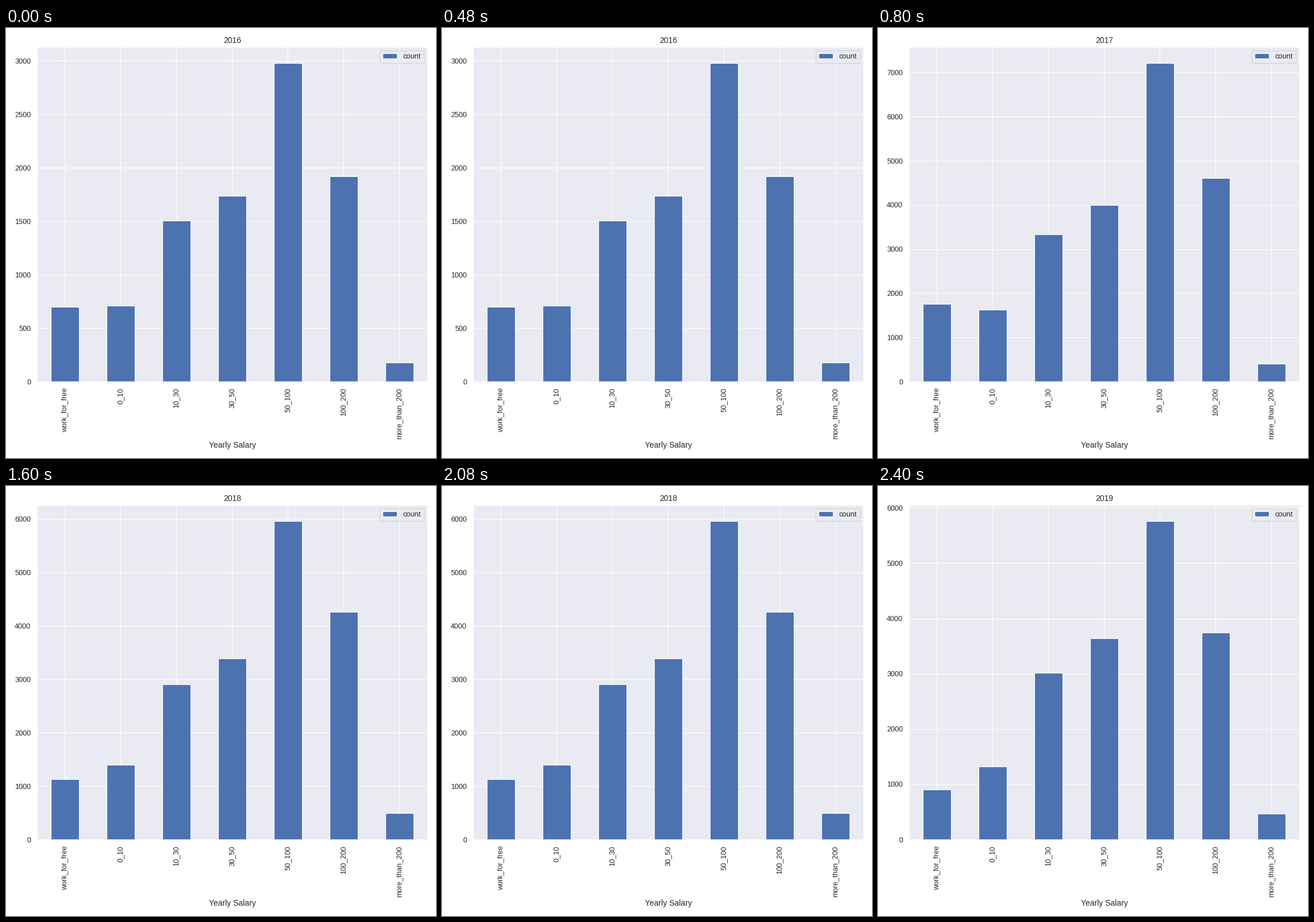
A matplotlib script for the animation above (3200 ms loop, 748x748 px).

```python
import matplotlib.pyplot as plt
from matplotlib.animation import FuncAnimation

SIZE = 748
INCHES = 8.5
DPI = 88
K = INCHES / 9  # style sizes are meant for a nine-inch chart

BLUE, PANEL, INK = "#4C72B0", "#EAEAF2", "0.15"
LEFT, RIGHT, TOP, BOTTOM = 54, 733, 32.8, 615  # plot edges in pixels

GROUPS = ["work_for_free", "0_10", "10_30", "30_50",
          "50_100", "100_200", "more_than_200"]
# year, tick step, count per group
YEARS = [
    (2016, 500, [699, 712, 1506, 1740, 2983, 1922, 176]),
    (2017, 1000, [1757, 1627, 3334, 3998, 7221, 4604, 404]),
    (2018, 1000, [1130, 1398, 2905, 3389, 5966, 4260, 490]),
    (2019, 1000, [909, 1322, 3017, 3644, 5769, 3749, 472]),
]

plt.rcParams.update({
    "font.family": "Liberation Sans",
    "text.color": INK,
    "axes.labelcolor": INK,
})

fig = plt.figure(figsize=(INCHES, INCHES), dpi=DPI, facecolor="white")
ax = fig.add_axes([LEFT / SIZE, 1 - BOTTOM / SIZE,
                   (RIGHT - LEFT) / SIZE, (BOTTOM - TOP) / SIZE],
                  facecolor=PANEL)
ax.set_axisbelow(True)
ax.grid(color="white", linewidth=K)
for spine in ax.spines.values():
    spine.set(color="white", linewidth=1.25 * K)

bars = ax.bar(range(len(GROUPS)), YEARS[0][2], width=0.5, color=BLUE,
              edgecolor="white", linewidth=K, label="count")
ax.set_xlim(-0.5, len(GROUPS) - 0.5)
ax.set_xticks(range(len(GROUPS)), GROUPS, rotation=90)
ax.tick_params(length=0, pad=9.5 * K, labelsize=11 * K, labelcolor=INK)
ax.set_xlabel("Yearly Salary", fontsize=12 * K, labelpad=4 * K)
ax.legend(loc="upper right", fontsize=11 * K, facecolor=PANEL,
          edgecolor="0.8", framealpha=0.8)
ax.get_legend().get_frame().set_linewidth(K)


def draw(i):
    year, step, counts = YEARS[i % len(YEARS)]
    top = max(counts) * 1.05
    for bar, count in zip(bars, counts):
        bar.set_height(count)
    ax.set_yticks(range(0, int(top) + 1, step))
    ax.set_ylim(0, top)
    ax.set_title(str(year), fontsize=12 * K, pad=6 * K)
    return []


anim = FuncAnimation(fig, draw, frames=len(YEARS), interval=800,
                     init_func=lambda: draw(0), repeat=True, repeat_delay=0)
plt.show()
```
